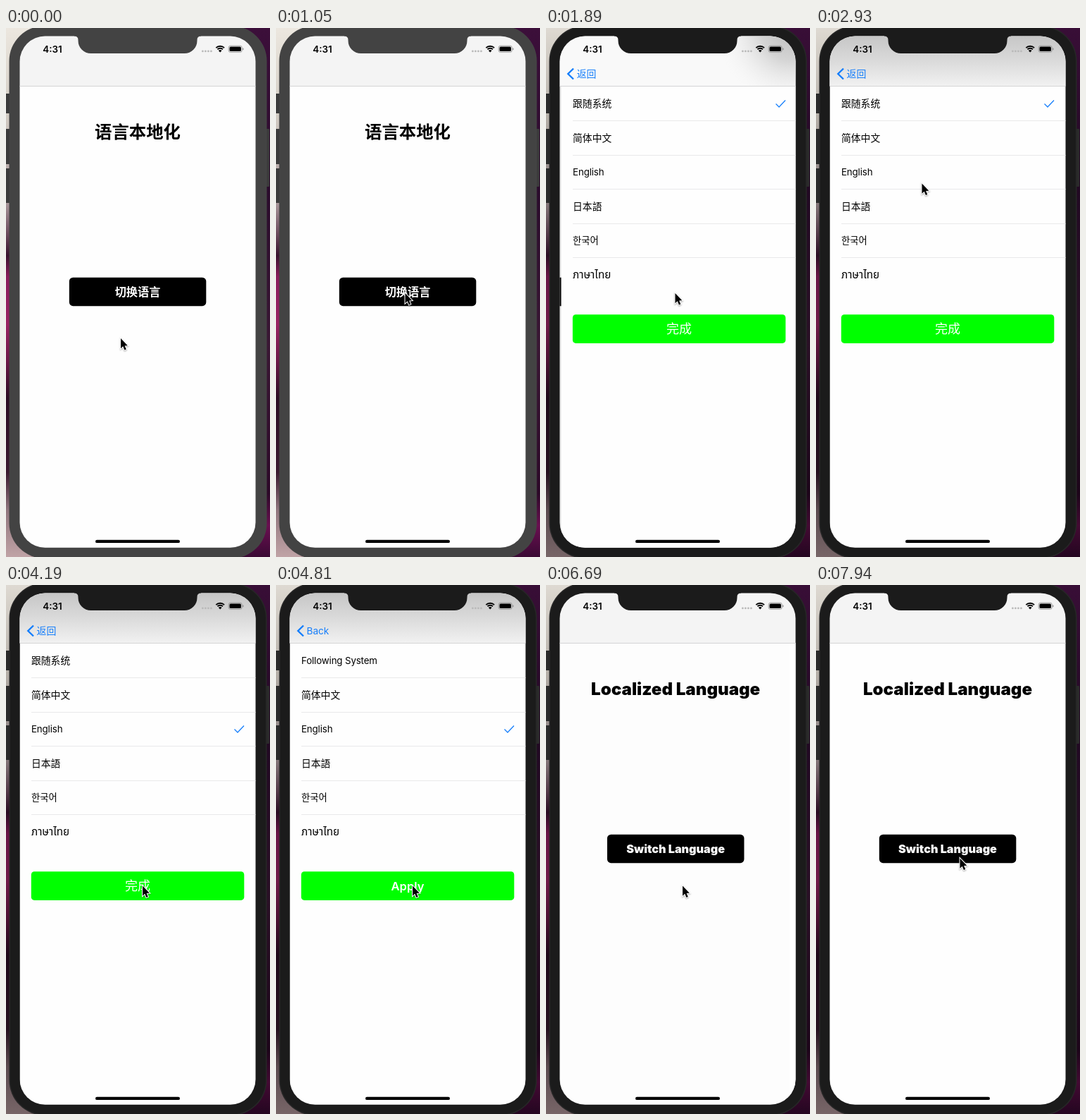
An HTML page with a canvas that plays this animation: 375x750 px, repeating every 8 s.

```html
<!DOCTYPE html>
<html lang="zh-CN">
<head>
<meta charset="utf-8">
<title>语言本地化</title>
<style>
html, body { margin: 0; width: 100%; height: 100%; overflow: hidden; background: #1b1b1b; }
canvas { display: block; width: 375px; height: 750px; }
</style>
</head>
<body>
<canvas id="stage" width="375" height="750"></canvas>
<script>
const ctx = document.getElementById('stage').getContext('2d');
const LOOP = 8000;
const SANS = 'Inter, "Noto Sans CJK SC", "Noto Sans Thai", "Noto Sans", sans-serif';
const BLUE = '#157efb';
const SCREEN = { x: 19.5, y: 11.5, w: 335, h: 725.3 };
const BAR_END = 82;

const TICKS = [0, 630, 840, 1050, 1470, 1680, 1890, 2090, 2720, 2930, 3140, 3560, 3770, 3980,
  4190, 4400, 4600, 4810, 6480, 6690, 6900, 7110, 7730, 7940];

// Pointer path: time, x, y.
const PATH = [[0, 163, 440], [630, 174.5, 397.5], [840, 178.5, 381.5], [1050, 183.5, 376],
  [2720, 171.5, 288.5], [2930, 150.5, 220.5], [3140, 146, 195.5], [3560, 160, 225.5],
  [3770, 193, 338.5], [3980, 195.5, 416.5], [4190, 194, 426.5], [7730, 205.5, 401], [7940, 204.5, 387.5]];

const lastBefore = (list, t, key) => list.filter(v => key(v) <= t).pop();

// Critically damped spring used by the navigation transitions.
function spring(ms) {
  const x = Math.max(0, ms) * 0.02;
  return 1 - (1 + x) * Math.exp(-x);
}

function box(x, y, w, h, r, fill) {
  ctx.beginPath();
  ctx.roundRect(x, y, w, h, r);
  ctx.fillStyle = fill;
  ctx.fill();
}

function line(points, color, width) {
  ctx.beginPath();
  points.forEach(([x, y]) => ctx.lineTo(x, y));
  ctx.strokeStyle = color;
  ctx.lineWidth = width;
  ctx.stroke();
}

function text(s, x, y, size, { weight = 400, color = '#000', align = 'left', track = 0, family = SANS } = {}) {
  ctx.font = `${weight} ${size}px ${family}`;
  ctx.letterSpacing = track * size + 'px';
  ctx.textAlign = align;
  ctx.fillStyle = color;
  ctx.fillText(s, x, y);
  ctx.letterSpacing = '0px';
}

function gradient(g, colors) {
  colors.forEach(([at, color]) => g.addColorStop(at, color));
  return g;
}

function wallpaper(active) {
  ctx.fillStyle = gradient(ctx.createLinearGradient(0, 0, 0, 750), [
    [0, '#ece7df'], [0.16, '#d3cdc4'], [0.33, '#a8979a'], [0.39, '#6b4a5c'], [0.43, '#38122e'],
    [0.47, '#8a1c5c'], [0.56, '#9a2463'], [0.63, '#6d1848'], [0.7, '#2c0c24'], [0.84, '#3b1a30'],
    [0.91, '#8f757c'], [1, '#c0a3a6']]);
  ctx.fillRect(0, 0, 188, 750);
  ctx.fillStyle = gradient(ctx.createLinearGradient(0, 0, 0, 750), [
    [0, '#3c0f3a'], [0.3, '#2a0b2c'], [0.6, '#3a1734'], [0.88, '#2c0828'], [0.94, '#6a0f50'], [1, '#3a0a34']]);
  ctx.fillRect(188, 0, 187, 750);
  if (active) {
    // The focused window's shadow falls downwards.
    ctx.fillStyle = gradient(ctx.createLinearGradient(0, 0, 0, 750),
      [[0, 'rgba(0,0,0,.06)'], [0.3, 'rgba(0,0,0,.2)'], [1, 'rgba(0,0,0,.38)']]);
    ctx.fillRect(0, 0, 375, 750);
  }
}

function phone(active) {
  const key = active ? '#2b2b2b' : '#3b3b3b';
  [[93, 28], [143, 50], [199, 49]].forEach(([y, h]) => box(-3, y, 9, h, 1, key));
  box(367, 143, 7, 82, 1, key);
  box(4.5, -3, 366, 755, 50, active ? '#272727' : '#444');
  box(6, -1.5, 363, 752, 48.5, active ? '#1b1b1b' : '#434343');
}

function notch(color) {
  ctx.beginPath();
  ctx.moveTo(97, 10);
  ctx.lineTo(97, 11.5);
  ctx.quadraticCurveTo(102.5, 11.5, 102.5, 17);
  ctx.arcTo(102.5, 36, 121, 36, 18);
  ctx.arcTo(271.5, 36, 271.5, 17, 18);
  ctx.lineTo(271.5, 17);
  ctx.quadraticCurveTo(271.5, 11.5, 277, 11.5);
  ctx.lineTo(277, 10);
  ctx.fillStyle = color;
  ctx.fill();
}

function home(shift, english) {
  const style = { weight: english ? 900 : 700, align: 'center' };
  const mid = 187 + shift;
  ctx.fillStyle = '#fefefe';
  ctx.fillRect(19, BAR_END, 336, 660);
  text(english ? 'Localized Language' : '语言本地化', mid, 156, english ? 24.1 : 24.4, style);
  box(89.8 + shift, 353.7, 194.5, 40.5, 5.4, '#000');
  text(english ? 'Switch Language' : '切换语言', mid, 380, 16.2, { ...style, color: '#fff' });
}

function list(shift, english, chosen) {
  const rows = [english ? 'Following System' : '跟随系统', '简体中文', 'English', '日本語', '한국어', 'ภาษาไทย'];
  const sizes = [english ? 13.3 : 13.8, 13.8, 13.3, 13.8, 13.3, 15.2];
  const tongue = { 3: 'JP', 4: 'KR' };
  ctx.fillStyle = '#fefefe';
  ctx.fillRect(19.5 + shift, BAR_END, 336, 660);
  rows.forEach((name, i) => {
    const y = 107 + i * 48.5;
    const latin = /^[A-Z]/.test(name);
    const family = tongue[i] ? `"Noto Sans CJK ${tongue[i]}", sans-serif` : SANS;
    text(name, 36 + shift, y + 5, sizes[i], { family, track: latin ? -0.01 : 0 });
    if (i < 5) {
      ctx.fillStyle = '#e9e9ea';
      ctx.fillRect(36 + shift, Math.round(y + 24), 330, 1);
    }
    if (i === chosen) {
      line([[324.5, y + 0.5], [329, y + 5], [338, y - 4.5]].map(([a, b]) => [a + shift, b]), BLUE, 1.25);
    }
  });
  box(35.8 + shift, 406.3, 302.5, 40.6, 4.4, '#0f0');
  text(english ? 'Apply' : '完成', 187 + shift, 433, english ? 16.6 : 18,
    { weight: english ? 600 : 500, align: 'center', color: '#fff' });
}

function navBar(p, english) {
  ctx.fillStyle = '#f4f4f4';
  ctx.fillRect(19, 11, 336, 71);
  if (p > 0.999) {
    ctx.fillStyle = gradient(ctx.createLinearGradient(0, 11, 0, BAR_END),
      [[0, '#c6c6c6'], [0.5, '#dadada'], [1, '#f1f1f1']]);
    ctx.fillRect(19, 11, 336, 71);
  } else if (p > 0.1) {
    ctx.fillStyle = 'rgba(255,255,255,.5)';
    ctx.fillRect(19, 11, 336, 71);
    ctx.globalAlpha = p * p;
    ctx.fillStyle = gradient(ctx.createRadialGradient(348, 4, 0, 348, 4, 105),
      [[0, '#bcbcbc'], [0.4, '#d4d4d4'], [1, 'rgba(244,244,244,0)']]);
    ctx.fillRect(19, 11, 336, 71);
    ctx.globalAlpha = 1;
  }
  ctx.fillStyle = '#d4d4d5';
  ctx.fillRect(19, BAR_END, 336, 1);
  if (p < 0.1) return;
  ctx.globalAlpha = p;
  text(english ? 'Back' : '返回', 43.5 + 32 * (1 - p), 70, english ? 13.6 : 13.9, { color: BLUE });
  ctx.globalAlpha = Math.min(1, p * 2);
  line([[39, 57.5], [31.3, 65], [39, 72.5]], BLUE, 2.4);
  ctx.globalAlpha = 1;
}

function statusBar() {
  text('4:31', 52.3, 34.5, 13.4, { weight: 600 });
  for (let i = 0; i < 4; i++) box(278 + i * 4, 31.5, 2.8, 2.8, 1.4, '#b9b9b9');
  ctx.strokeStyle = '#000';
  ctx.lineWidth = 1.9;
  for (const r of [8.3, 5.3]) {
    ctx.beginPath();
    ctx.arc(304.2, 34, r, -Math.PI * 0.75, -Math.PI * 0.25);
    ctx.stroke();
  }
  ctx.beginPath();
  ctx.moveTo(304.2, 34.5);
  ctx.arc(304.2, 34.5, 3.4, -Math.PI * 0.75, -Math.PI * 0.25);
  ctx.fillStyle = '#000';
  ctx.fill();
  ctx.beginPath();
  ctx.roundRect(316.2, 25.2, 19, 9.2, 2.6);
  ctx.strokeStyle = '#8a8a8a';
  ctx.lineWidth = 0.8;
  ctx.stroke();
  box(317.5, 26.5, 16.4, 6.6, 1.5, '#000');
  box(336.2, 28.3, 1.2, 3, 0.6, '#8a8a8a');
}

function spinner(t) {
  box(146, 333, 82, 82, 9, 'rgba(0,0,0,.78)');
  const head = Math.floor(t / 1000 * 12);
  ctx.lineCap = 'round';
  for (let i = 0; i < 12; i++) {
    const a = i * Math.PI / 6;
    const age = ((head - i) % 12 + 12) % 12;
    const at = r => [187 + r * Math.sin(a), 374 - r * Math.cos(a)];
    line([at(8.5), at(14.5)], `rgba(255,255,255,${1 - age * 0.06})`, 2.6);
  }
  ctx.lineCap = 'butt';
}

function pointer(x, y) {
  ctx.save();
  ctx.translate(x, y);
  ctx.beginPath();
  [[0, 0], [0, 14.2], [3.2, 11.3], [5.4, 16.4], [7.8, 15.4], [5.6, 10.4], [9.8, 10.2]]
    .forEach(([a, b]) => ctx.lineTo(a, b));
  ctx.closePath();
  ctx.shadowColor = 'rgba(0,0,0,.35)';
  ctx.shadowBlur = 2;
  ctx.shadowOffsetY = 1;
  ctx.strokeStyle = '#fff';
  ctx.lineWidth = 2;
  ctx.stroke();
  ctx.shadowColor = 'transparent';
  ctx.fillStyle = '#000';
  ctx.fill();
  ctx.restore();
}

function draw(t) {
  const active = t >= 1470;
  const english = t >= 4810;
  const popping = t >= 6480;
  const p = popping ? 1 - spring(t - 6419) : spring(t - 1530);

  wallpaper(active);
  phone(active);

  ctx.save();
  ctx.beginPath();
  ctx.roundRect(SCREEN.x, SCREEN.y, SCREEN.w, SCREEN.h, 36);
  ctx.clip();
  if (p < 0.999) {
    home(-0.3 * SCREEN.w * p, english);
    ctx.fillStyle = `rgba(0,0,0,${0.1 * p})`;
    ctx.fillRect(19, BAR_END, 336, 660);
  }
  if (p > 0.001) list(SCREEN.w * (1 - p), english, t >= 3560 ? 2 : 0);
  navBar(p, english);
  statusBar();
  box(127, 725.7, 120, 4.4, 2.2, '#000');
  ctx.restore();

  notch(active ? '#1b1b1b' : '#434343');
  if (t >= 4400 && t < 4810) spinner(t);
  const [, x, y] = lastBefore(PATH, t, v => v[0]);
  pointer(x, y);
}

function frame() {
  draw(lastBefore(TICKS, performance.now() % LOOP, v => v));
  requestAnimationFrame(frame);
}
frame();
</script>
</body>
</html>
```
